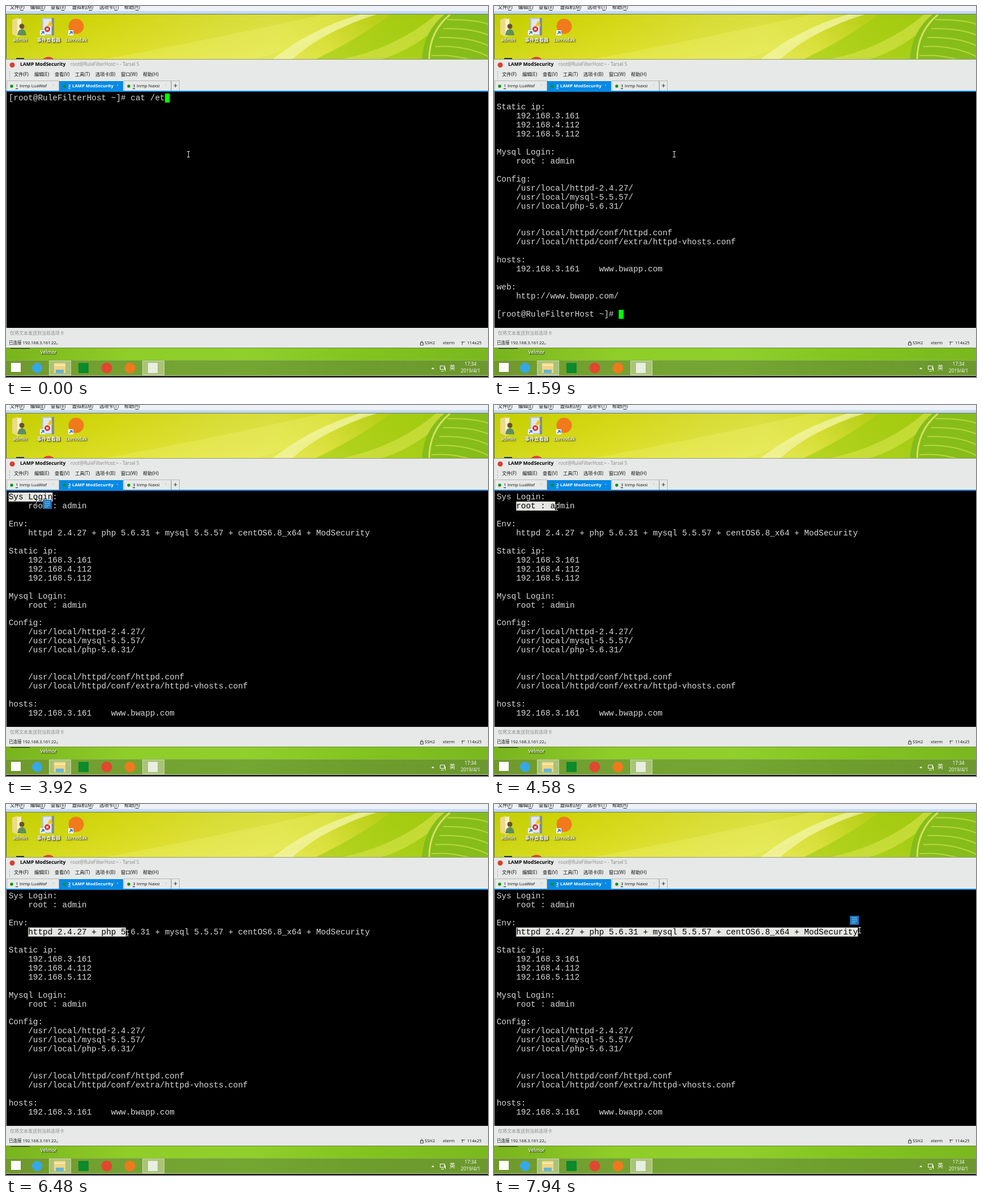
These frames come from a looping animation (852x657 px, 8 s). An HTML page with a canvas:

```html
<!DOCTYPE html>
<html lang="zh">
<head>
<meta charset="utf-8">
<title>Terminal session</title>
<style>
  html, body { margin: 0; width: 100%; height: 100%; overflow: hidden; background: #000; }
  canvas { display: block; }
</style>
</head>
<body>
<canvas id="stage" width="852" height="657"></canvas>
<script>
const ctx = document.getElementById('stage').getContext('2d');
const UI_FONT = '"Open Sans", "Noto Sans CJK SC", "Noto Sans CJK", sans-serif';
const LOOP = 8000, TICK = 135.2;

// Terminal grid
const CELL = 8.63, ROW = 15.96, LEFT = 4.7, TOP = 155, ROWS = 25;
const PROMPT = '[root@RuleFilterHost ~]# ';
const OUTPUT = `Sys Login:
    root : admin

Env:
    httpd 2.4.27 + php 5.6.31 + mysql 5.5.57 + centOS6.8_x64 + ModSecurity

Static ip:
    192.168.3.161
    192.168.4.112
    192.168.5.112

Mysql Login:
    root : admin

Config:
    /usr/local/httpd-2.4.27/
    /usr/local/mysql-5.5.57/
    /usr/local/php-5.6.31/


    /usr/local/httpd/conf/httpd.conf
    /usr/local/httpd/conf/extra/httpd-vhosts.conf

hosts:
    192.168.3.161    www.bwapp.com

web:
    http://www.bwapp.com/

${PROMPT}`.split('\n');

const TYPING = [[0, 'cat /et'], [120, 'cat /etc'], [250, 'cat /etc/'], [370, 'cat /etc/is'], [500, 'cat /etc/issue']];

// Pointer path: time, x, y
const PATH = [
  [0, 322, 262], [1570, 322, 262], [1571, 318, 262], [1740, 318, 262],
  [2380, 53, 180], [2515, 53, 180], [2530, 30, 166], [2700, 7, 164], [2950, 7, 164],
  [3600, 83, 164], [3750, 83, 164], [3860, 53, 172], [4010, 53, 172],
  [4130, 42, 180], [4300, 41, 180], [4700, 150, 181], [4850, 150, 181],
  [5000, 162, 184], [5180, 40, 235], [5350, 5, 208], [5480, 5, 208],
  [5740, 40, 210], [5900, 40, 210], [6060, 40, 228], [6200, 40, 228],
  [6740, 420, 229], [6840, 478, 236], [6980, 478, 236], [7500, 646, 223], [8000, 646, 223]
];

// Drags: start, release, cleared, row, column
const DRAGS = [
  [2950, 3740, 4010, 0, 0], [4300, 4840, 5000, 1, 4],
  [5480, 5890, 5930, 3, 0], [6200, 8000, 8000, 4, 4]
];

// Copy buttons: from, to, x, y
const BUTTONS = [[3770, 4010, 65, 168], [4740, 5000, 135, 186], [7940, 8000, 629, 198]];

function rect(x, y, w, h, color) {
  ctx.fillStyle = color;
  ctx.fillRect(x, y, w, h);
}

function disc(x, y, r, color) {
  ctx.fillStyle = color;
  ctx.beginPath();
  ctx.arc(x, y, r, 0, Math.PI * 2);
  ctx.fill();
}

function shape(path, color) {
  ctx.fillStyle = color;
  ctx.fill(new Path2D(path));
}

function line(path, color, width = 1) {
  ctx.strokeStyle = color;
  ctx.lineWidth = width;
  ctx.stroke(new Path2D(path));
}

function label(text, x, y, { color = '#111', size = 8.3, weight = 400, align = 'left' } = {}) {
  ctx.font = `${weight} ${size}px ${UI_FONT}`;
  ctx.textAlign = align;
  ctx.textBaseline = 'middle';
  ctx.fillStyle = color;
  ctx.fillText(text, x, y);
  return ctx.measureText(text).width;
}

function gradient(x0, y0, x1, y1, ...colors) {
  const g = ctx.createLinearGradient(x0, y0, x1, y1);
  colors.forEach((c, i) => g.addColorStop(i / (colors.length - 1), c));
  return g;
}

function desktopLabel(text, x, y) {
  ctx.shadowColor = '#000';
  ctx.shadowBlur = 2;
  ctx.shadowOffsetX = ctx.shadowOffsetY = 1;
  label(text, x, y, { color: '#fff', size: 8.4, weight: 600, align: 'center' });
  ctx.shadowColor = 'transparent';
  ctx.shadowBlur = ctx.shadowOffsetX = ctx.shadowOffsetY = 0;
}

function shortcutArrow(x, y) {
  rect(x, y, 9, 9, '#f4f8fc');
  line(`M${x + 2} ${y + 7}L${x + 6} ${y + 3}M${x + 3} ${y + 2.5}h4v4`, '#1767b5', 1.4);
}

function drawWallpaper() {
  rect(0, 15, 852, 80, gradient(0, 60, 852, 40, '#c4cf02', '#cfd506', '#d8da14', '#dcde2c',
    '#dfe245', '#e2e652', '#d8e03a', '#b4d01c', '#9cc814', '#8cc018'));
  rect(0, 15, 852, 80, gradient(0, 15, 0, 95, 'rgba(190,200,0,.25)', 'rgba(235,235,90,.3)'));
  shape('M170 95Q360 60 560 15H640Q560 60 440 95Z', 'rgba(238,240,110,.35)');
  shape('M505 95Q560 45 655 15H625Q540 40 470 95Z', 'rgba(250,250,190,.6)');
  shape('M545 95Q620 60 680 15H852V95Z', 'rgba(160,204,16,.65)');
  shape('M590 95Q690 75 760 15H790Q720 80 660 95Z', 'rgba(222,232,80,.55)');
  shape('M735 95Q738 45 775 15H852V95Z', '#86bd1a');
  line('M748 95Q748 45 785 15', '#d4e25a', 3);
  for (let i = 0; i < 5; i++) {
    line(`M${752 + i * 7} ${88 - i * 16}Q${805 + i * 6} ${84 - i * 15} 852 ${108 - i * 19}`, '#b7d640', 2);
  }
}

function drawDesktopIcons() {
  shape('M11 24l10-3 3 3v27l-4 3-9-4Z', '#ecd98a');
  shape('M20 24l7-2v30l-7 2Z', '#fff4c4');
  disc(28, 36, 4.5, '#6b5030');
  shape('M20 52q1-11 8-11t8 11Z', '#5f8f5c');
  desktopLabel('admin', 25, 60.5);

  rect(64, 21, 18, 31, '#b8c4cc');
  rect(66, 23, 14, 27, '#e0e7ec');
  rect(81, 21, 4, 31, '#7d8d98');
  shape('M78 26l5 9H73Z', '#f2c416');
  disc(73, 41, 5, '#d62a2a');
  line('M71 39l4 4M75 39l-4 4', '#fff', 1.3);
  shortcutArrow(60, 43);
  desktopLabel('事件查看器', 75.5, 60.5);

  disc(124, 36, 13.5, '#f07a1c');
  shortcutArrow(110, 43);
  desktopLabel('Lumodak', 124.5, 60.5);

  rect(18, 92, 14, 3, '#24364c');
  disc(75, 103, 13, '#e0452f');
}

function drawTopMenu() {
  rect(0, 0, 852, 10, '#eef1f5');
  rect(0, 9, 852, 5, '#c5d9ee');
  rect(0, 14, 852, 1, '#66766c');
  [['文件(F)', 7], ['编辑(E)', 43], ['查看(V)', 79], ['虚拟机(M)', 117], ['选项卡(T)', 165], ['帮助(H)', 209]]
    .forEach(([text, x]) => {
      const width = label(text, x, 3);
      rect(x + width - 8, 7, 6, 1, '#222');
    });
  rect(0, 15, 1, 80, '#5b6a2a');
}

function drawTab(x, w, digit, text, active) {
  rect(x, 133, w, 18, active ? '#0789e4' : '#e7e9e9');
  if (!active) {
    ctx.strokeStyle = '#b4b7b9';
    ctx.lineWidth = 1;
    ctx.strokeRect(x + .5, 132.5, w - 1, 18);
  }
  disc(x + 9, 142, 2.7, '#089408');
  const style = { color: active ? '#fff' : '#111', size: 7.8, weight: active ? 700 : 400 };
  label(digit, x + 16, 142, style);
  rect(x + 16, 146, 4, 1, style.color);
  label(text, x + 23, 142, style);
  label('×', x + w - 12, 141.5, { color: active ? '#8fd0ff' : '#c5c5c5', size: 7 });
}

function drawWindow() {
  rect(0, 94, 852, 1, '#8f9a7c');
  rect(0, 95, 852, 56, '#e7e9e9');
  disc(11, 104.5, 4.5, '#d8402c');
  label('LAMP ModSecurity', 25, 104, { color: '#000', size: 8.6, weight: 700 });
  label('root@RuleFilterHost:~ - Tarsel 5', 114, 104, { color: '#858585' });
  for (let y = 116; y < 129; y += 3) rect(6, y, 1, 1, '#888');
  [['文件(F)', 14], ['编辑(E)', 50], ['查看(V)', 86], ['工具(T)', 122], ['选项卡(B)', 158], ['窗口(W)', 203], ['帮助(H)', 242]]
    .forEach(([text, x]) => label(text, x, 122));
  drawTab(1, 93, '1', 'lnmp LuaWaf');
  drawTab(208, 84, '3', 'lnmp Naxsi');
  drawTab(94, 113, '2', 'LAMP ModSecurity', true);
  ctx.strokeStyle = '#b4b7b9';
  ctx.strokeRect(292.5, 132.5, 14, 18);
  line('M296.5 141h6M299.5 138v6', '#444', 1.2);
  rect(0, 150, 852, 2, '#0789e4');
  rect(0, 152, 1, 418, '#b9bcbc');

  rect(0, 570, 852, 35, '#e7e9e9');
  label('仅将文本发送到当前选项卡', 7, 580, { color: '#8a8a8a', size: 8 });
  label('已连接 192.168.3.161:22。', 5, 597, { size: 7.5 });
  ctx.strokeStyle = '#444';
  ctx.lineWidth = 1;
  ctx.strokeRect(732.5, 596.5, 5, 4);
  line('M733.5 596v-1.5q1.5-2 3 0V596', '#444');
  label('SSH2', 740, 597, { size: 7.6 });
  label('xterm', 772, 597, { size: 7.6 });
  line('M806.5 600v-5h5M805 596l1.5-2 1.5 2', '#555');
  label('114x25', 815, 597, { size: 7.6 });
}

function drawTaskbar() {
  rect(0, 605, 852, 23, gradient(0, 0, 852, 0, '#78b41c', '#8fcd28', '#90cf2c', '#82c31f', '#7ab81f'));
  rect(0, 605, 852, 1, '#6c8a35');
  rect(8, 606, 34, 1, '#26321a');
  desktopLabel('Velmor', 75, 613.5);
  rect(0, 627, 852, 28, gradient(0, 0, 852, 0, '#70982c', '#74a232', '#74a632', '#6d9d2c', '#6c982e'));
  rect(0, 627, 852, 1, '#8db452');
  rect(0, 654, 852, 1, '#cfdcb0');
  rect(0, 655, 852, 2, '#111');

  for (const x of [76, 241]) {
    rect(x, 628, 39, 26, '#a9c378');
    ctx.strokeStyle = '#c9dba6';
    ctx.lineWidth = 1;
    ctx.strokeRect(x + .5, 628.5, 38, 25);
  }
  rect(9, 632, 17, 16, '#fff');
  disc(55, 641, 9, '#35a8e6');
  rect(85, 632, 20, 18, '#f0d682');
  rect(85, 635, 20, 2, '#fff1bd');
  rect(88, 644, 14, 6, '#66b4dc');
  rect(128, 632, 18, 18, '#0c8a2c');
  disc(178, 641, 9.5, '#e0472f');
  disc(219, 641, 9.5, '#ee7a1e');
  rect(251, 632, 17, 18, '#e8efe0');

  shape('M752 643l2.5-3 2.5 3Z', '#fff');
  line('M767.5 637.5h8v6h-8ZM769 646.5h5M773.5 640.5h3v6', '#fff');
  label('英', 789, 641, { color: '#fff', size: 10, align: 'center' });
  label('17:34', 821, 635, { color: '#fff', align: 'center' });
  label('2019/4/1', 821, 646.5, { color: '#fff', align: 'center' });
}

const lastBefore = (steps, t) => steps.filter(([start]) => start <= t).pop();

function pointerAt(t) {
  const q = Math.max(0, Math.floor((t - 1580) / TICK) * TICK + 1580);
  const i = Math.max(1, PATH.findIndex(([time]) => time >= q));
  const [t0, x0, y0] = PATH[i - 1], [t1, x1, y1] = PATH[i];
  const k = (q - t0) / (t1 - t0);
  return [x0 + (x1 - x0) * k, y0 + (y1 - y0) * k];
}

function drawLines(lines, color) {
  ctx.font = `${CELL / .6}px "Liberation Mono", monospace`;
  ctx.textAlign = 'left';
  ctx.textBaseline = 'alphabetic';
  ctx.fillStyle = color;
  lines.forEach((text, row) => ctx.fillText(text, LEFT, TOP + row * ROW + 12));
}

function drawSelection(lines, t) {
  const drag = DRAGS.find(([start, , end]) => t >= start && t < end);
  if (!drag) return;
  const [, release, , row, column] = drag;
  const [x, y] = pointerAt(Math.min(t, release));
  const endX = LEFT + Math.floor((x - LEFT) / CELL) * CELL;
  const endRow = Math.floor((y - TOP) / ROW);
  const startX = LEFT + column * CELL;
  ctx.save();
  ctx.beginPath();
  if (endRow > row) {
    ctx.rect(startX, TOP + row * ROW, 852 - startX, ROW);
    ctx.rect(LEFT, TOP + endRow * ROW, endX - LEFT, ROW);
  } else {
    ctx.rect(startX, TOP + row * ROW, Math.max(0, endX - startX), ROW);
  }
  ctx.clip();
  rect(0, 152, 852, 418, '#e6e6e2');
  drawLines(lines, '#000');
  ctx.restore();
}

function drawPointer(x, y) {
  x = Math.round(x);
  y = Math.round(y);
  ctx.globalCompositeOperation = 'difference';
  rect(x, y - 4, 1, 9, '#ddd');
  rect(x - 2, y - 5, 5, 1, '#ddd');
  rect(x - 2, y + 5, 5, 1, '#ddd');
  ctx.globalCompositeOperation = 'source-over';
}

function drawTerminal(t) {
  const scroll = t < 1740 ? 5 : 0;
  const lines = t < 780 ? [PROMPT + lastBefore(TYPING, t)[1]] : OUTPUT.slice(scroll, scroll + ROWS);
  rect(1, 152, 851, 418, '#000');
  drawLines(lines, '#d9d9d9');
  const last = lines.length - 1;
  if (lines[last].startsWith(PROMPT)) {
    rect(LEFT + lines[last].length * CELL, TOP + last * ROW, CELL, ROW, '#0f0');
  }
  drawSelection(lines, t);
  for (const [from, to, x, y] of BUTTONS) {
    if (t < from || t >= to) continue;
    rect(x, y, 16, 16, '#1673bd');
    for (let i = 0; i < 4; i++) rect(x + 3, y + 3 + i * 3, i < 3 ? 10 : 7, 1, '#9ccbee');
  }
  drawPointer(...pointerAt(t));
}

drawWallpaper();
drawDesktopIcons();
drawTopMenu();
drawWindow();
drawTaskbar();

const begin = performance.now();
function frame() {
  drawTerminal((performance.now() - begin) % LOOP);
  requestAnimationFrame(frame);
}
frame();
</script>
</body>
</html>
```
